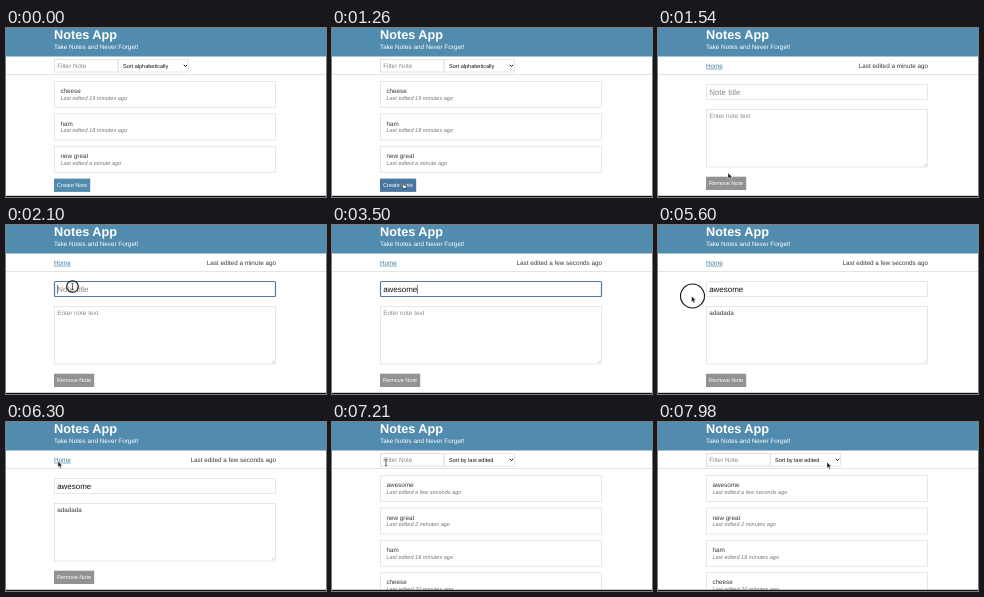
An HTML page for the animation above (8000 ms loop, 320 px wide and 169 px high).

```html
<!DOCTYPE html>
<html lang="en">
<head>
<meta charset="utf-8">
<title>Notes App</title>
<style>
  html, body { margin: 0; width: 100%; height: 100%; overflow: hidden; background: #fff; }
  svg { display: block; width: 100%; height: 100%; }
  text { font-family: "Liberation Sans", Arial, sans-serif; text-rendering: geometricPrecision; white-space: pre; }
</style>
</head>
<body>
<svg id="stage" viewBox="0 0 320 169" preserveAspectRatio="none"></svg>
<script>
const LOOP = 8000;
const stage = document.getElementById('stage');
const INK = '#333c44', GREY = '#8b8b8b', BLUE = '#518bae';
const SMALL = 5.55, BODY = 6.34, LARGE = 7.95;

const OPEN_EDITOR = 1400, FOCUS_TITLE = 1960, FOCUS_BODY = 3710, BLUR = 5600, OPEN_LIST = 6790;
const titleKeys = [2240, 2310, 2520, 2660, 2870, 3220, 3290, 3500];
const bodyKeys = [4270, 4550, 4690, 4760, 4900, 4970, 5110];
const clicks = [[1050, 1260], [1960, 2170], [5600, 5810], [6510, 6720]];

// Pointer runs: visible from, to, then points of [time, x, y]
const runs = [
  [70, 2240, [[70, 123, 17], [420, 84, 92], [700, 58, 159], [840, 63, 160], [1000, 70.5, 154.5],
    [1450, 70.5, 154.5], [1900, 65.5, 61.5]]],
  [5250, LOOP, [[5250, 65.5, 61.5], [5580, 33.5, 71], [5900, 33.5, 71], [6300, 52, 39.2],
    [7180, 52, 39.2], [7500, 88, 85], [7960, 169, 40]]]
];

const text = (x, y, size, fill, str, extra = '') =>
  `<text x="${x}" y="${y}" font-size="${size}" fill="${fill}" ${extra}>${str}</text>`;
const box = (x, y, w, h, fill, stroke = 'none', sw = 0.8, r = 0) =>
  `<rect x="${x}" y="${y}" width="${w}" height="${h}" rx="${r}" fill="${fill}" stroke="${stroke}" stroke-width="${sw}"/>`;
const line = (d, stroke, sw, extra = '') =>
  `<path d="${d}" fill="none" stroke="${stroke}" stroke-width="${sw}" ${extra}/>`;

const pen = document.createElement('canvas').getContext('2d');
function widthOf(str, size) {
  pen.font = '100px "Liberation Sans", Arial, sans-serif';
  return pen.measureText(str).width * size / 100;
}

function header() {
  return box(0, 0, 320, 28.5, BLUE) +
    text(48, 11.4, 12.7, '#fff', 'Notes App', 'font-weight="bold"') +
    text(48, 20.7, BODY, '#fff', 'Take Notes and Never Forget!') +
    line('M0 46.5H320', '#dedede', 0.8);
}

function button(y, w, fill, label) {
  return box(48, y, w, 13.3, fill) + text(51.1, y + 8.6, SMALL, '#fff', label);
}

function list(order, notes) {
  const cards = notes.map(([name, age], i) => {
    const y = 53.5 + i * 32.4;
    return box(48.5, y, 221, 26, '#fff', '#e2e2e2') +
      text(54.4, y + 11.6, BODY, INK, name) +
      text(54.4, y + 18.5, SMALL, '#777', `Last edited ${age} ago`, 'font-style="italic"');
  });
  return box(48.5, 31.5, 63.5, 12.5, '#fff', '#d9d9d9') +
    text(51.2, 39.7, BODY, GREY, 'Filter Note') +
    box(112.5, 31.5, 70, 12.5, '#fff', '#e2e2e2') +
    text(117, 39.5, SMALL, '#111', order) +
    line('M177.8 36.8l1.7 1.8l1.7-1.8', '#111', 1) +
    cards.join('');
}

// Input or text area with placeholder, typed part and caret
function field(y, h, base, size, hint, typed, fill, focus) {
  const caret = 51.4 + widthOf(typed, size);
  return box(48.5, y, 221, h, '#fff', focus ? '#54779f' : '#e2e2e2', focus ? 1.2 : 0.8, focus ? 1 : 0) +
    text(51.2, base, size, typed ? fill : GREY, typed || hint) +
    (focus ? line(`M${caret} ${base - size * 0.85}v${size * 1.1}`, '#222', 0.6) : '');
}

function editor(t) {
  const typed = (word, keys) => word.slice(0, keys.filter(k => t >= k).length);
  const age = t < titleKeys[0] ? 'a minute' : 'a few seconds';
  const name = typed('awesome', titleKeys.slice(0, 1).concat(titleKeys.slice(2)));
  return text(48, 39.7, BODY, '#3f7ba3', 'Home', 'text-decoration="underline"') +
    text(270, 39.7, BODY, INK, `Last edited ${age} ago`, 'text-anchor="end"') +
    field(56.5, 15, 66.8, LARGE, 'Note title', name, '#111', t >= FOCUS_TITLE && t < FOCUS_BODY) +
    field(81.5, 57.5, 90.2, BODY, 'Enter note text', typed('adadada', bodyKeys), INK, t >= FOCUS_BODY && t < BLUR) +
    line('M265.8 138l2.7-2.7M267.3 138l1.2-1.2', '#999', 0.4) +
    button(148.7, 40.2, '#929292', 'Remove Note');
}

function place(points, t) {
  const i = points.findIndex(p => p[0] > t);
  if (i < 0) return points[points.length - 1].slice(1);
  const [a, b] = [points[Math.max(i - 1, 0)], points[i]];
  let k = a === b ? 0 : (t - a[0]) / (b[0] - a[0]);
  k = k * k * (3 - 2 * k);
  return [a[1] + (b[1] - a[1]) * k, a[2] + (b[2] - a[2]) * k];
}

const shapes = {
  arrow: '<path d="M0 0V6.2L1.4 4.9L2.4 7.2L3.5 6.7L2.5 4.5H4.4Z" fill="#111" stroke="#fff" stroke-width=".5"/>',
  hand: '<path d="M.3 .4Q1-.4 1.5 .5V2.4L3.6 3Q4.2 3.4 3.9 4.4L3.4 6H.9L-1 3.6Q-.7 2.8 .3 3.5Z" fill="#fff" stroke="#111" stroke-width=".7"/>',
  beam: line('M0-3.3Q1-3.3 1-2.5Q1-3.3 2-3.3M1-2.5V2.7M0 3.5Q1 3.5 1 2.7Q1 3.5 2 3.5', '#222', 0.7)
};

function pointer(t) {
  const run = runs.find(([from, to]) => t >= from && t < to);
  if (!run) return '';
  const [x, y] = place(run[2], t);
  const editing = t >= OPEN_EDITOR && t < OPEN_LIST;
  const inField = editing && x > 48 && (y > 57 && y < 72 || y > 82 && y < 139);
  const inFilter = t >= OPEN_LIST && x < 112 && y < 44;
  const shape = inField || inFilter ? 'beam' : t >= 910 && t < 1500 ? 'hand' : 'arrow';
  const click = clicks.find(([from, to]) => t >= from && t < to);
  const radius = click && (t < click[1] - 70 ? 12 : 5.8);
  return `<g transform="translate(${x} ${y})">${shapes[shape]}` +
    (click ? `<circle cx="1" r="${radius}" fill="none" stroke="#111" stroke-width="1.1"/>` : '') + '</g>';
}

function scene(t) {
  let page;
  if (t < OPEN_EDITOR) {
    page = list('Sort alphabetically', [['cheese', '19 minutes'], ['ham', '18 minutes'], ['new great', 'a minute']]) +
      button(150.6, 36.2, t < 910 ? BLUE : '#4878a2', 'Create Note');
  } else if (t < OPEN_LIST) {
    page = editor(t);
  } else {
    page = list('Sort by last edited', [['awesome', 'a few seconds'], ['new great', '2 minutes'],
      ['ham', '18 minutes'], ['cheese', '20 minutes']]);
  }
  return box(0, 0, 320, 169, '#fff') + header() + page + pointer(t) + box(0, 167.8, 320, 1.2, '#111');
}

const start = performance.now();
function tick() {
  stage.innerHTML = scene((performance.now() - start) % LOOP);
  requestAnimationFrame(tick);
}
tick();
</script>
</body>
</html>
```
